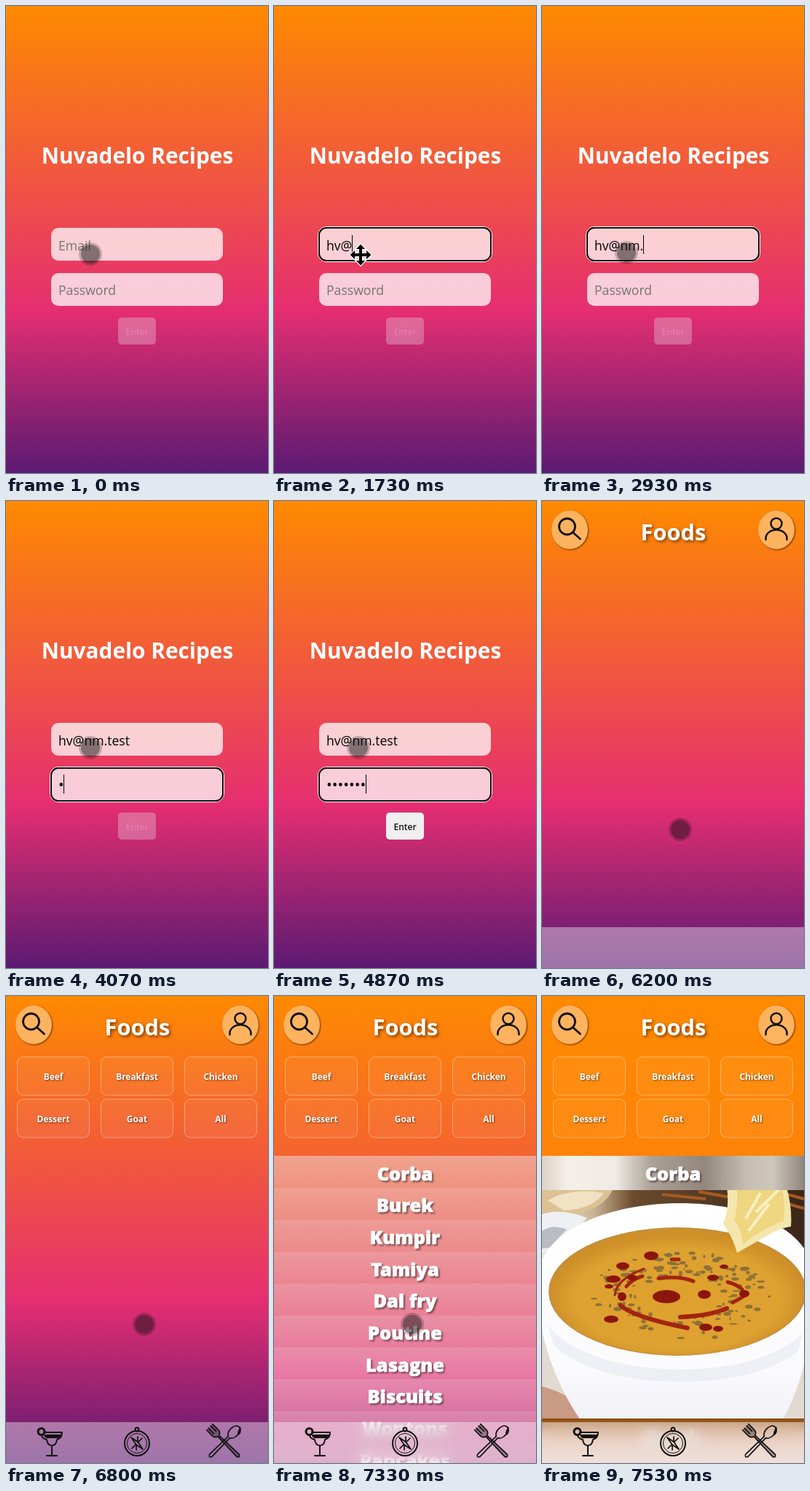
Write an HTML page that moves like this. It is 360x640 px and loops after 9670 ms.

```html
<!DOCTYPE html>
<html lang="en">
<head>
<meta charset="utf-8">
<title>Recipe app</title>
<style>
html, body { margin: 0; width: 100%; height: 100%; overflow: hidden; }
#stage { position: relative; width: 360px; height: 640px; overflow: hidden;
  font-family: "Open Sans", "Noto Sans", sans-serif; }
#stage > * { position: absolute; left: 0; top: 0; }
#bg { width: 360px; height: 640px; background: linear-gradient(#ff8a00, #e52e71 65%, #5b1a72); }
#stage > #bar { top: 584px; width: 360px; height: 56px;
  background: rgba(255,255,255,.4); backdrop-filter: blur(10px); }
text { white-space: pre; }
.mid { text-anchor: middle; }
.title { font-weight: 700; fill: #fff; }
.field { font-size: 17.6px; }
.hint { fill: #757575; }
.dots { font-size: 20.6px; }
.dish { font: 800 25.4px "Open Sans", "Noto Sans", sans-serif; fill: #fff; stroke: #fff; stroke-width: .7; }
.dishes { filter: drop-shadow(2px 2px 1px rgba(60,40,40,.65)); }
.cat text { font-size: 11.9px; font-weight: 700; fill: #fff;
  filter: drop-shadow(1px 1px 1px rgba(0,0,0,.55)); }
.cat rect { fill: rgba(255,255,255,.05); stroke: rgba(255,255,255,.36); }
.icon { fill: none; stroke: #111; stroke-width: 2; stroke-linecap: round; stroke-linejoin: round; }
.round { fill: #ffb35f; filter: drop-shadow(1px 1px 1px rgba(70,30,0,.75)); }
</style>
</head>
<body>
<div id="stage">
  <div id="bg"></div>

  <svg id="login" width="360" height="640">
    <text class="title mid" x="180.5" y="216" font-size="29.8">Nuvadelo Recipes</text>
    <g fill="rgba(255,255,255,.75)">
      <rect x="62" y="304" width="236" height="45" rx="10"/>
      <rect x="62" y="366" width="236" height="45" rx="10"/>
    </g>
    <g id="ring" fill="none">
      <rect x="60.5" y="302.5" width="239" height="48" rx="11.5" stroke="#fff"/>
      <rect x="62" y="304" width="236" height="45" rx="10" stroke="#101010" stroke-width="2"/>
    </g>
    <text id="mail" class="field" x="72" y="334.5"></text>
    <text id="pass" class="field" x="72" y="396"></text>
    <rect id="caret" width="1" height="26"/>
    <rect id="btn" x="154" y="427" width="52" height="37" rx="5"/>
    <text id="enter" class="mid" x="180" y="451" font-size="12" font-weight="600">Enter</text>
  </svg>

  <svg id="list" width="360" height="640"></svg>
  <svg id="photo" width="360" height="640"></svg>
  <div id="bar"></div>

  <svg id="home" width="360" height="640">
    <ellipse class="round" cx="38" cy="39.5" rx="25" ry="26.5"/>
    <ellipse class="round" cx="322" cy="39.5" rx="25" ry="26.5"/>
    <text class="title mid" x="180.5" y="54" font-size="30.8"
      style="filter:drop-shadow(2px 2px 2px rgba(60,20,0,.65))">Foods</text>
    <g id="cats"></g>
    <g id="icons">
      <path class="icon" style="stroke-width:2.8"
        d="M45.5 35a11 11 0 1 1-22 0a11 11 0 1 1 22 0M42.5 43L52.5 52"/>
      <path class="icon" style="stroke-width:2.5"
        d="M329.5 31a7.5 7.5 0 1 1-15 0a7.5 7.5 0 1 1 15 0M307.5 53v-2a14.5 11.5 0 0 1 29 0v2"/>
      <g class="icon">
        <circle cx="48.5" cy="597" r="4.5" stroke-width="3"/>
        <path d="M52 598H77q0 8-7 10q-1 8-7 8t-7-8q-7-2-7-6M63 616V630M56 630H70"/>
        <path fill="#111" d="M53 602H75q-1 3-4 3H57q-3 0-4-3z"/>
      </g>
      <g class="icon">
        <circle cx="180" cy="613" r="17"/>
        <circle cx="180" cy="613" r="13.5" style="stroke-width:1"/>
        <circle cx="180" cy="594" r="2.5"/>
        <path style="stroke-width:1.7" d="M172 605l9 6l7 10l-9-6zM187 606l-5 5M173 620l5-5M181 604v6M179 616v6"/>
      </g>
      <g class="icon" style="stroke-width:1.5">
        <path transform="translate(300 611) rotate(-45) scale(1.15)" fill="#111" fill-opacity=".35"
          d="M-5-25v9q0 5 4 6l-1 33q2 4 4 0l-1-33q4-1 4-6v-9M-2-25v9M2-25v9"/>
        <path transform="translate(300 611) rotate(45) scale(1.15)"
          d="M0-25c8 0 7 16 1.500-0.500M0-25c7 0 7 15 1.300 17l.7 31q-2 4-4 0l.7-31c-6-2-6-17 1.300-17z"/>
      </g>
    </g>
  </svg>

  <svg id="pointer" width="360" height="640">
    <g id="touch" fill="#141414">
      <circle r="16" fill-opacity=".22"/>
      <circle r="13" fill-opacity=".38"/>
    </g>
    <g id="move" transform="translate(119 341)" stroke="#fff" stroke-width="2.5" paint-order="stroke"></g>
  </svg>
</div>

<script>
const LOOP = 9670;
const $ = id => document.getElementById(id);
const show = (el, on) => { el.style.display = on ? '' : 'none'; };

// Last entry of a [time, ...values] table that has been reached
const at = (table, t) => table.findLast(row => row[0] <= t);

const MAIL = 'hv@nm.test';
const mailLen = [[0, 0], [1270, 1], [1400, 2], [1730, 3], [2200, 4], [2730, 5], [2930, 6], [3000, 8], [3070, 10]];
const passLen = [[0, 0], [4070, 1], [4130, 3], [4400, 5], [4530, 6], [4870, 7]];
const caretOn = [[0, 0], [330, 1], [870, 0], [1270, 1], [2000, 0], [2200, 1], [3800, 0], [4070, 1], [5400, 0]];
const touchAt = [[0, 116, 340], [70, 116, 338], [5400, 124, 350], [5467, 145, 382], [5533, 168, 417], [5600, 184, 441], [5670, 190, 450]];
const iconCount = [[0, 0], [6200, 2], [6267, 3], [6333, 4], [6400, 5]];
const pageHeight = [[0, 640], [7330, 800], [7400, 1700], [7467, 3000], [7530, 4400]];

function buildHome() {
  const names = ['Beef', 'Breakfast', 'Chicken', 'Dessert', 'Goat', 'All'];
  $('cats').innerHTML = names.map((name, i) => {
    const x = 15 + i % 3 * 115, y = 83 + (i > 2 ? 58 : 0);
    return `<g class="cat"><rect x="${x + .5}" y="${y + .5}" width="99" height="52.5" rx="8"/>
      <text class="mid" x="${x + 50}" y="${y + 32}">${name}</text></g>`;
  }).join('');

  const arrow = '<path d="M-2 0V-8H-6L0 -14.5L6 -8H2V0z"/>';
  $('move').innerHTML = [0, 90, 180, 270].map(a => `<g transform="rotate(${a})">${arrow}</g>`).join('')
    + '<path stroke="none" d="M-2 -8H2V8H-2zM-8 -2H8V2H-8z"/>';
}

const dish = (name, y) => `<text class="dish mid" x="180" y="${y}">${name}</text>`;

function buildList() {
  const names = ['Corba', 'Burek', 'Kumpir', 'Tamiya', 'Dal fry', 'Poutine', 'Lasagne', 'Biscuits', 'Wontons', 'Pancakes'];
  const top = i => 219 + i * 43.7;
  $('list').innerHTML = `<linearGradient id="veil" x2="0" y2="1">
      <stop stop-color="#ebe4ec" stop-opacity=".5"/><stop offset="1" stop-color="#ebe4ec" stop-opacity=".4"/></linearGradient>`
    + names.map((n, i) => `<rect y="${top(i)}" width="360" height="43.7" fill="url(#veil)"/>`).join('')
    + `<g class="dishes">${names.map((n, i) => dish(n, top(i) + 33.5)).join('')}</g>`;
}

function buildPhoto() {
  let seed = 7;
  const rnd = () => (seed = seed * 16807 % 2147483647) / 2147483647;

  let herbs = '';
  for (let i = 0; i < 150; i++) {
    const a = rnd() * 6.283, r = .4 + rnd() * .45;
    const x = 190 + 150 * r * Math.cos(a), y = 412 + 72 * r * Math.sin(a);
    herbs += `<ellipse cx="${x.toFixed(1)}" cy="${y.toFixed(1)}" rx="${(1 + rnd() * 5).toFixed(1)}" ry="${(1 + rnd() * 2).toFixed(1)}"/>`;
  }

  const drops = [[171, 412, 19, 9], [150, 356, 10, 6], [111, 370, 9, 5], [124, 386, 7, 4], [98, 388, 10, 5],
    [95, 443, 10, 5], [223, 409, 9, 6], [235, 386, 8, 4], [225, 454, 9, 5], [242, 456, 7, 4],
    [250, 371, 6, 3], [110, 412, 6, 6], [278, 408, 7, 5], [92, 398, 6, 3]]
    .map(([x, y, rx, ry]) => `<ellipse cx="${x}" cy="${y}" rx="${rx}" ry="${ry}"/>`).join('');

  $('photo').innerHTML = `
  <defs>
    <linearGradient id="back"><stop stop-color="#eeeae2"/><stop offset=".2" stop-color="#c9b393"/>
      <stop offset=".35" stop-color="#6a4a2c"/><stop offset="1" stop-color="#3c2618"/></linearGradient>
    <linearGradient id="cap"><stop stop-color="#ddd3c4"/><stop offset=".1" stop-color="#f4efe8"/>
      <stop offset=".28" stop-color="#efeae4"/><stop offset=".42" stop-color="#aba096"/>
      <stop offset=".62" stop-color="#93877d"/><stop offset=".78" stop-color="#c6beb0"/>
      <stop offset=".88" stop-color="#cdc6ba"/><stop offset="1" stop-color="#8f867e"/></linearGradient>
    <linearGradient id="bowl" x2="0" y2="1"><stop stop-color="#fff"/><stop offset=".7" stop-color="#fbfbfe"/>
      <stop offset="1" stop-color="#eeeef4"/></linearGradient>
    <radialGradient id="soup" cy=".55"><stop stop-color="#dfa02c"/><stop offset=".8" stop-color="#dea232"/>
      <stop offset="1" stop-color="#cf9028"/></radialGradient>
    <linearGradient id="next" x2="0" y2="1"><stop stop-color="#8a4c10"/><stop offset=".1" stop-color="#9c5c22"/>
      <stop offset=".4" stop-color="#dcb096"/><stop offset="1" stop-color="#e6cfc8"/></linearGradient>
  </defs>
  <svg y="219" width="360" height="360" viewBox="0 219 360 360">
    <rect y="219" width="360" height="360" fill="url(#back)"/>
    <path d="M165 272l60 6M215 268l50 9M330 270l30 8M335 284l25 7" stroke="#a65a25" stroke-width="4"/>
    <path d="M0 262H98Q90 288 52 297L0 306z" fill="#dcc193"/>
    <path d="M8 280Q40 262 85 270Q70 292 30 294z" fill="#f0e2c2"/>
    <path d="M0 430H360V579H0z" fill="#e2dad0"/>
    <path d="M0 535Q40 545 75 579H0z" fill="#c99b85"/>
    <path d="M0 299Q25 290 62 304L30 340L0 352z" fill="#eef0f3"/>
    <path d="M0 322Q14 312 34 320L10 345L0 346z" fill="#b9bcc2"/>
    <path d="M-8 395C-8 325 85 284 190 284S376 325 376 395C375 470 350 560 318 600H68C32 560 -6 480 -8 395z" fill="url(#bowl)"/>
    <path d="M8 450C60 525 285 535 358 462L352 487C275 548 75 540 16 478z" fill="#e3e5ee" opacity=".5"/>
    <ellipse cx="186" cy="405" rx="177" ry="88" fill="#c48f3a"/>
    <ellipse cx="186" cy="406" rx="174" ry="86" fill="url(#soup)"/>
    <g fill="#6b5f3a" opacity=".7">${herbs}</g>
    <g fill="none" stroke="#a3240f" stroke-linecap="round" stroke-width="5">
      <path d="M108 424Q125 440 200 455M190 440Q232 438 254 428" stroke-width="6"/>
      <path d="M160 387q30-4 48 4M116 398q8-10 22-14M262 420q12-6 20-12M255 392q14 4 20 10M178 361h10"/>
      <path d="M100 410q2-22 40-36" stroke-width="3"/>
    </g>
    <g fill="#8c1609">${drops}</g>
    <path d="M254 262H336Q344 290 342 316Q324 318 300 334L268 352Q262 330 249 312Q258 290 254 262z" fill="#f4e6ac"/>
    <path d="M268 262H330Q335 288 332 308Q304 318 276 340Q274 318 264 308Q270 286 268 262z" fill="#efd680"/>
    <path d="M280 305L300 270M284 322L312 285M325 266L294 296" stroke="#f9efc4" stroke-width="4"/>
    <rect y="219" width="360" height="47" fill="url(#cap)"/>
  </svg>
  <rect y="579" width="360" height="61" fill="url(#next)"/>
  <g class="dishes">${dish('Corba', 252.5)}${dish('Burek', 612.5)}</g>`;
}

function field(el, text, hint, cls) {
  const value = text || hint;
  if (el.textContent !== value) el.textContent = value;
  el.setAttribute('class', 'field ' + (text ? cls : 'hint'));
}

function drawLogin(t) {
  const onPass = t >= 3270;
  const mail = MAIL.slice(0, at(mailLen, t)[1]);
  const pass = '•'.repeat(at(passLen, t)[1]);
  field($('mail'), mail, 'Email', '');
  field($('pass'), pass, 'Password', 'dots');

  show($('ring'), t >= 330);
  $('ring').setAttribute('transform', `translate(0 ${onPass ? 62 : 0})`);

  const active = $(onPass ? 'pass' : 'mail');
  const width = (onPass ? pass : mail) ? active.getComputedTextLength() : 0;
  show($('caret'), at(caretOn, t)[1]);
  $('caret').setAttribute('x', Math.floor(72 + width));
  $('caret').setAttribute('y', onPass ? 375 : 314);

  const ready = t >= 4870;
  $('btn').setAttribute('fill', ready ? '#efefef' : 'rgba(239,239,239,.3)');
  $('enter').setAttribute('fill', ready ? '#111' : 'rgba(240,150,195,.5)');
}

function draw(t) {
  const home = t >= 5930;
  $('bg').style.height = at(pageHeight, t)[1] + 'px';
  show($('login'), !home);
  show($('home'), home);
  show($('bar'), home);
  show($('cats'), t >= 6800);
  show($('list'), t >= 7330 && t < 7530);
  show($('photo'), t >= 7530);
  if (!home) drawLogin(t);

  const loaded = at(iconCount, t)[1];
  [...$('icons').children].forEach((icon, i) => show(icon, i < loaded));

  const cross = t >= 1470 && t < 1800;
  const [, x, y] = at(touchAt, t);
  show($('move'), cross);
  show($('touch'), !cross && t < 7400);
  $('touch').setAttribute('transform', `translate(${x} ${y})`);
}

function tick() {
  draw(performance.now() % LOOP);
  requestAnimationFrame(tick);
}

buildHome();
buildList();
buildPhoto();
tick();
</script>
</body>
</html>
```
